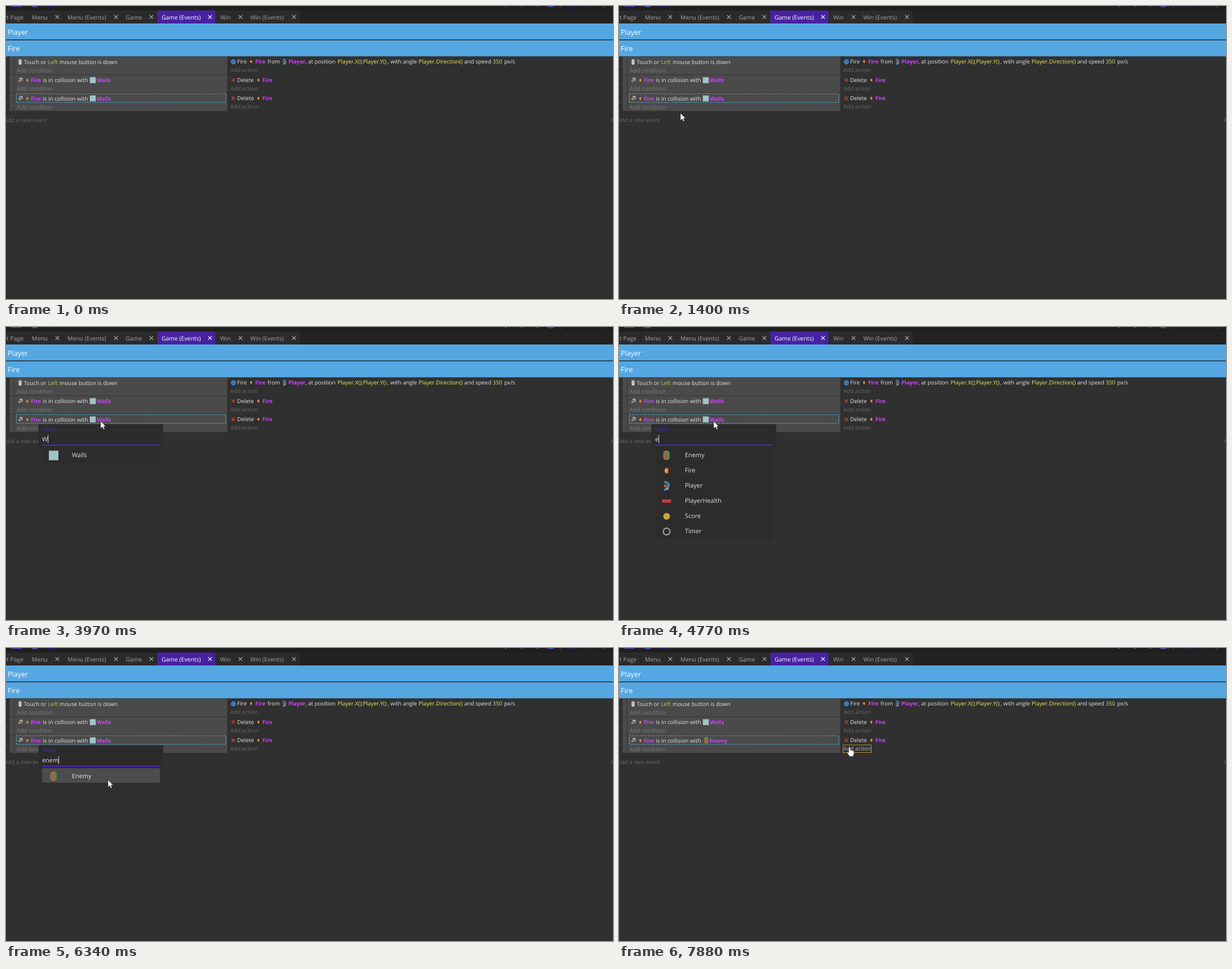
Write an HTML page that moves like this. It is 1077 px wide and 520 px high and loops after 8000 ms.

```html
<!DOCTYPE html>
<html lang="en">
<head>
<meta charset="utf-8">
<title>Event sheet</title>
<style>
  html, body { margin: 0; width: 100%; height: 100%; overflow: hidden; background: #303030; }
  svg { display: block; width: 1077px; height: 520px; }
  text { font-family: "Open Sans", "Noto Sans", sans-serif; font-size: 9.85px; fill: #e2e2e2;
         white-space: pre; text-rendering: geometricPrecision; }
  .tab { font-size: 10.4px; fill: #a2a2a2; }
  .on { fill: #fff; }
  .head { font-size: 12.5px; fill: #fff; }
  .obj { font-size: 9.6px; font-weight: 700; fill: #cb43fb; }
  .exp { fill: #e6ea62; }
  .num { fill: #d3e070; }
  .key { fill: #a3cc50; }
  .hintC { fill: #7b7b7b; }
  .hintA { fill: #686868; }
  .field { font-size: 10.9px; }
</style>
</head>
<body>
<svg id="stage" viewBox="0 0 1077 520" xmlns="http://www.w3.org/2000/svg"></svg>
<script>
const LOOP = 8000;
const stage = document.getElementById('stage');

const rect = (x, y, w, h, fill, more = '') =>
  `<rect x="${x}" y="${y}" width="${w}" height="${h}" fill="${fill}" ${more}/>`;
const line = (d, color, width = 1, more = '') =>
  `<path d="${d}" fill="none" stroke="${color}" stroke-width="${width}" ${more}/>`;
const label = (x, y, str, cls = '', more = '') =>
  `<text x="${x}" y="${y}" class="${cls}" ${more}>${str}</text>`;
const group = (id, body, more = '') => `<g id="${id}" ${more}>${body}</g>`;
const at = (x, y, body) => `<g transform="translate(${x} ${y})">${body}</g>`;

// Small pictures, each centred on its own origin
const bullet = rect(-1.5, -2.5, 3, 5, '#d9783c', 'rx="1"') + rect(-1.5, -1, 1.5, 2, '#f3c06a');
const wall = size => rect(-size / 2, -size / 2, size, size, '#a2c3c7');
const enemy =
  '<path d="M-4 -8H3L6 -4 4 0 6 4 3 8H-4L-6 4V-4Z" fill="#3f8f52"/>' +
  '<path d="M-5 -6H1L3 -2V3L0 6H-5L-6 2V-3Z" fill="#8d6a4c"/>' +
  rect(-4, -8, 6, 2, '#c8742f') + rect(-4, 5, 7, 2.5, '#d2542f') + rect(3, -3, 2, 6, '#27a35f');
const player =
  line('M-2.5 -4.5Q3 -3.5 2 0Q1 4 -3 4.5', '#3d86bd', 2.4) + rect(-3, -1.5, 3, 3, '#b3643c') + rect(0, 2, 2, 2, '#d9a66a');
const collide = rect(-1.5, -4, 5.5, 5.5, '#b5aa9d') + rect(-4, -1, 5.5, 5, '#8f8375', 'stroke="#3a3a3a" stroke-width=".6"');
const gear = '<circle r="3.1" fill="none" stroke="#3f87dc" stroke-width="2.2"/>' +
  '<circle r="4.2" fill="none" stroke="#3f87dc" stroke-width="1" stroke-dasharray="1.6 1.7"/>' +
  '<circle r="1" fill="#b9d6f5"/>';
const cross = (r, color, width) => line(`M${-r} ${-r}L${r} ${r}M${r} ${-r}L${-r} ${r}`, color, width);
const mouse = rect(-2.5, -4.5, 5, 9.5, '#e4e4e4', 'rx="2"') + line('M0 -3.5V0', '#4a4a4a') + line('M-1.5 2H1.5', '#777');

function toolbar() {
  let s = rect(0, 0, 1077, 31, '#222') + rect(0, 0, 1077, 8, '#1f1f1f');
  s += rect(9, 0, 19, 1.2, '#4453c4') + rect(72, 0, 18, 1.2, '#35186f');
  for (const x of [51, 966]) s += line(`M${x - 7} -1Q${x} 4 ${x + 7} -1`, '#3c6bc0', 1.4);
  for (const x of [887, 915, 943]) s += line(`M${x - 2.5} -1L${x} 1L${x + 2.5} -1`, '#7a45d8', 1.2);
  s += rect(983, 0, 1, 4, '#484848') + rect(998, 0, 11, 1.3, '#35186f') + rect(1033, 0, 4, 1, '#35186f');
  return s + line('M1058 0L1062 3', '#555');
}

function tabs() {
  let s = rect(0, 8, 521, 23, '#2b2b2b') + rect(268.5, 8, 103, 23, '#4722a0');
  for (const x of [38, 101, 205, 426]) s += rect(x, 8, 1, 23, '#252525');
  s += label(31, 24, 'Start Page', 'tab', 'text-anchor="end"');
  const list = [['Menu', 46, 91], ['Menu (Events)', 109, 195], ['Game', 212.5, 258],
    ['Game (Events)', 276, 362], ['Win', 380, 416], ['Win (Events)', 433.5, 511]];
  for (const [name, x, close] of list) {
    const on = name === 'Game (Events)';
    s += label(x, 24, name, on ? 'tab on' : 'tab') + at(close, 19.5, cross(3.2, on ? '#fff' : '#b0b0b0', 1.2));
  }
  return s;
}

function collision(y, target) {
  return at(25.5, y - 4, collide) + at(38, y - 3.5, bullet) + label(44, y, 'Fire', 'obj') +
    label(65.3, y, 'is in collision with') + target;
}

function events() {
  let s = rect(0, 31, 1077, 28.6, '#55a7e2') + rect(0, 61, 1077, 28.3, '#55a7e2') + rect(0, 59.6, 1077, 1.4, '#26343e');
  s += label(3, 50.6, 'Player', 'head') + label(3, 80, 'Fire', 'head');
  [90, 122.4, 154.7].forEach((y, i) => {
    s += rect(6.5, y, 386, 31.6, '#4a4a4a') + rect(14, y, 1, 31.6, '#343434');
    s += rect(0, y + 16.5, 6.5, 1, '#4c4c4c');
    s += label(19, y + 28, 'Add condition', 'hintC');
    s += label(398, y + 27.3, 'Add action', 'hintA', `id="add${i}"`);
    if (i) s += at(403.3, y + 9, cross(3, '#d5472c', 1.3)) + label(410, y + 12.4, 'Delete') +
      at(448, y + 9, bullet) + label(455, y + 12.4, 'Fire', 'obj');
  });
  s += at(25, 99, mouse) + label(31.5, 102.8, 'Touch or') + label(74.5, 102.8, 'Left', 'key') +
    label(95, 102.8, 'mouse button is down');
  const y = 102.3;
  s += at(403.5, 99, gear) + label(410.3, y, 'Fire') + at(435, 98.5, bullet) + label(442.3, y, 'Fire', 'obj') +
    label(464, y, 'from') + at(494, 99, player) + label(501, y, 'Player', 'obj') +
    label(531, y, ', at position') + label(588.3, y, 'Player.X();Player.Y()', 'exp') +
    label(677, y, ', with angle') + label(732, y, 'Player.Direction()', 'exp') +
    label(813, y, 'and speed') + label(863.5, y, '350', 'num') + label(884, y, 'px/s');
  const walls = ty => at(154, ty - 3.7, wall(10.5)) + label(161, ty, 'Walls', 'obj');
  s += collision(135.3, walls(135.3));
  s += collision(167.7, group('oldTarget', walls(167.7)) +
    group('newTarget', `<g transform="translate(155 163.8) scale(.7)">${enemy}</g>` + label(160.5, 167.7, 'Enemy', 'obj')));
  s += rect(18.5, 155.5, 371.5, 15.5, 'none', 'stroke="#4fb2dc" stroke-dasharray="3 1.6"');
  s += rect(148, 155.5, 39.5, 16, 'none', 'id="pick" stroke="#b58f35"');
  s += rect(397.5, 172, 50, 13.5, 'none', 'id="addFrame" stroke="#b58f35"');
  return s + label(-3, 206, 'Add a new event', 'hintA') + label(1073, 206, 'Add\u2026', 'hintA');
}

const names = ['Enemy', 'Fire', 'Player', 'PlayerHealth', 'Score', 'Timer', 'Walls'];
const ROW = 27;
const icons = {
  Enemy: enemy, Walls: wall(17), Fire: `<g transform="scale(2)">${bullet}</g>`,
  Player: `<g transform="scale(1.6)">${player}</g>`,
  PlayerHealth: rect(-8, -3, 16, 6, '#b84040'),
  Score: '<circle r="6" fill="#c9a545"/>', Timer: '<circle r="6" fill="none" stroke="#a5a5a5" stroke-width="2"/>'
};

function popup() {
  let s = rect(57.5, 172.5, 221.5, 41.5, '#2b2b2b', 'rx="1"');
  s += rect(64, 209.7, 209, 1, '#1e1e1e');
  s += rect(64, 208.8, 209, 2, '#4b2bc4', 'id="rule"');
  s += '<text id="query" class="field" x="64" y="203"></text>' + label(0, 0, 'Object', '', 'id="caption"');
  s += rect(0, 192, 1, 14, '#e2e2e2', 'id="caret"');
  const rows = names.map((n, i) => group('row' + i,
    rect(64, 213, 209, ROW, '#2c2c2c') + rect(64, 239.5, 209, 1, '#272727') +
    rect(64, 213.2, 209, 26, '#4c4c4c', `rx="2" id="hover${i}"`) +
    at(84.5, 228, icons[n]) + label(117, 231.4, n, 'field'))).join('');
  return s + group('rows', rows);
}

const arrow = '<path d="M0 0V13L3 10.3 5 14.8 7.2 13.8 5.2 9.4H9Z" fill="#fff" stroke="#222" stroke-width=".6"/>';
const hand = '<path d="M-1.4 1Q0 -.8 1.4 1V5.5Q3 4.9 3.6 6 5 5.4 5.7 6.6 7.4 6.2 8 7.8V11Q7.8 13 6.6 14.5V16.5H-.6V15' +
  'Q-3.2 12.4 -4.2 9.8 -4 8 -2.4 8.8L-1.4 10Z" fill="#fff" stroke="#222" stroke-width=".6"/>';

stage.innerHTML = rect(0, 0, 1077, 520, '#303030') + toolbar() + tabs() + events() +
  group('popup', popup()) + group('cursor', group('arrow', arrow) + group('hand', hand));

const el = {};
stage.querySelectorAll('[id]').forEach(n => el[n.id] = n);
const show = (id, on) => el[id].setAttribute('visibility', on ? 'inherit' : 'hidden');
const set = (id, attrs) => { for (const k in attrs) el[id].setAttribute(k, attrs[k]); };
const clamp = v => Math.max(0, Math.min(1, v));
const lerp = (a, b, u) => a + (b - a) * u;

// Pointer journeys: first step, last step, number of steps, points passed
const moves = [
  [180, 940, 17, [[925, 530], [790, 445], [520, 330], [290, 268], [184, 233]]],
  [990, 1400, 7, [[184, 233], [128, 206], [91, 194], [109, 190]]],
  [1580, 2330, 16, [[109, 190], [150, 196], [207, 186], [192, 160], [168, 167]]],
  [5440, 5890, 9, [[168, 167], [160, 165], [157, 182], [168, 218], [181, 239]]],
  [6090, 6290, 5, [[181, 239], [181, 234]]],
  [6800, 7570, 16, [[181, 234], [255, 222], [360, 196], [424, 180], [409, 176]]],
  [7730, 7730, 1, [[409, 176], [403, 167]]],
  [7880, 7880, 1, [[403, 167], [409, 176]]]
];

function along(pts, u) {
  const last = pts.length - 1;
  const i = Math.min(Math.floor(u * last), last - 1), f = u * last - i;
  const p = k => pts[Math.max(0, Math.min(last, k))];
  return [0, 1].map(c => {
    const a = p(i - 1)[c], b = p(i)[c], d = p(i + 1)[c], e = p(i + 2)[c];
    return b + f / 2 * (d - a + f * (2 * a - 5 * b + 4 * d - e + f * (3 * (b - d) + e - a)));
  });
}

function pointer(t) {
  const move = moves.filter(m => t >= m[0]).pop();
  if (!move) return null;
  const [from, to, steps, pts] = move;
  const gap = (to - from) / Math.max(1, steps - 1) || 1;
  const u = clamp((Math.floor((t - from) / gap + 1e-6) + 1) / steps);
  return along(pts, steps > 1 ? u * u * (3 - 2 * u) : u);
}

const typing = [[0, 'Walls'], [3540, 'Wall'], [3690, 'Wal'], [3830, 'Wa'], [3970, 'W'], [4200, ''],
  [4770, 'e'], [4860, 'en'], [4940, 'ene'], [5030, 'enem']];
const caretOn = [[2730, 3210], [3690, 5440], [6090, 6390]];

function drawPopup(t, pos) {
  const open = t >= 2680 && t < 6390;
  show('popup', open);
  if (!open) return;
  const u = clamp(Math.floor((t - 2680) / 50) / 4);
  const ease = 1 - (1 - u) ** 2;
  set('caption', { transform: `translate(64 ${lerp(198.6, 184, ease)})`,
    style: `font-size:${lerp(10.4, 8.5, ease)}px;fill:${u < .5 ? '#d0d0d0' : '#4b2bc4'}` });
  set('rule', { x: 168.5 - 104.5 * ease, width: 209 * ease });

  const query = typing.filter(k => t >= k[0]).pop()[1];
  if (el.query.textContent !== query) el.query.textContent = query;
  set('caret', { x: 64 + (query ? el.query.getComputedTextLength() : 0) });
  show('caret', caretOn.some(([a, b]) => t >= a && t < b));

  set('rows', { opacity: clamp(Math.floor((t - 2730) / 50) / 4) });
  let shown = 0;
  names.forEach((n, i) => {
    const match = n.toLowerCase().includes(query.toLowerCase());
    show('row' + i, match);
    if (match) set('row' + i, { transform: `translate(0 ${ROW * shown++})` });
    show('hover' + i, match && n === 'Enemy' && pos[1] >= 213);
    if (!match) el['hover' + i].setAttribute('visibility', 'hidden');
  });
}

function draw(t) {
  const pos = pointer(t);
  show('cursor', pos);
  if (pos) set('cursor', { transform: `translate(${pos[0]} ${pos[1]})` });
  const onAdd = t >= 7730;
  show('arrow', !onAdd);
  show('hand', onAdd);
  show('addFrame', onAdd);
  set('add2', { style: onAdd ? 'fill:#b4b4b4' : '' });

  show('pick', t >= 2410 && t < 2730);
  set('pick', { opacity: clamp((Math.floor((t - 2410) / 60) + 1) / 3) });
  show('oldTarget', t < 6390);
  show('newTarget', t >= 6390);
  drawPopup(t, pos);
}

function frame() {
  draw(performance.now() % LOOP);
  requestAnimationFrame(frame);
}
frame();
</script>
</body>
</html>
```
